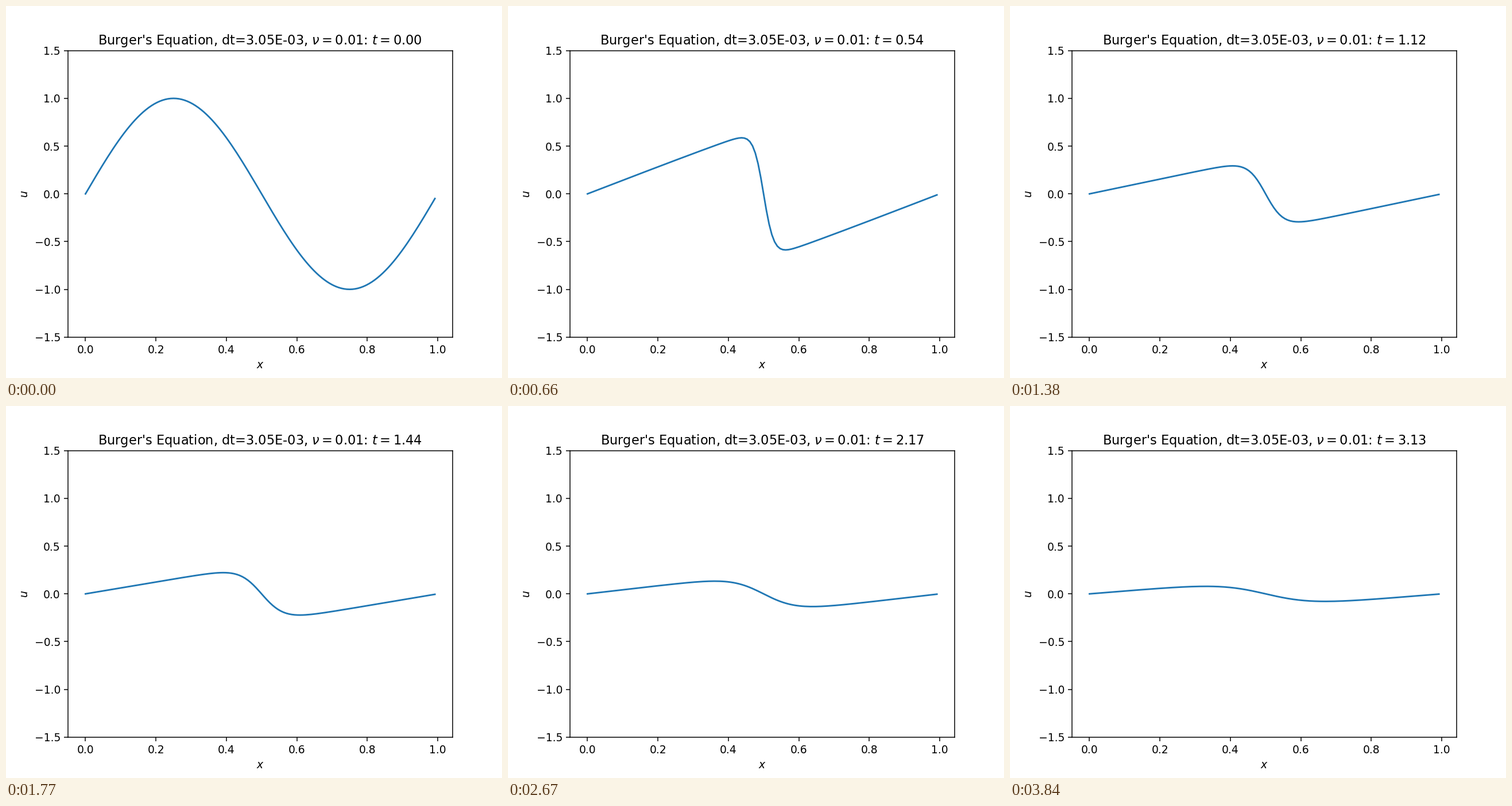
Recreate the animation shown at these times as a matplotlib script. Size 864 by 648 pixels, loop 3.87 s.

```python
import numpy as np
import matplotlib.pyplot as plt
from matplotlib.animation import FuncAnimation

N = 128                    # grid points on the periodic unit interval
NU = 0.01                  # viscosity
DT = 0.5 / N**2 / NU       # diffusive step limit
STEPS = 8                  # time steps per frame
FRAMES = 129
INTERVAL = 30

x = np.arange(N) / N
k = 2 * np.pi * np.fft.rfftfreq(N, 1 / N)

# Cole-Hopf: u = -2 nu phi_x / phi, where phi obeys the heat equation
phi0_hat = np.fft.rfft(np.exp((np.cos(2 * np.pi * x) - 1) / (4 * np.pi * NU)))


def solve(t):
    if t == 0:
        return np.sin(2 * np.pi * x)
    phi_hat = phi0_hat * np.exp(-NU * k**2 * t)
    phi = np.fft.irfft(phi_hat, N)
    phi_x = np.fft.irfft(1j * k * phi_hat, N)
    return -2 * NU * phi_x / phi


def title_text(t):
    # the small offset rounds exact halves up
    return rf"Burger's Equation, dt={DT:.2E}, $\nu={NU}$: $t={t + 1e-9:.2f}$"


plt.rcParams["font.family"] = "DejaVu Sans"
fig, ax = plt.subplots(figsize=(6.4, 4.8), dpi=135)
line, = ax.plot(x, solve(0), color="#1f77b4", lw=1.5)
ax.set_xlim(-0.05 * x[-1], 1.05 * x[-1])
ax.set_ylim(-1.5, 1.5)
ax.set_xlabel("$x$")
ax.set_ylabel("$u$")
title = ax.set_title(title_text(0))


def update(i):
    t = i * STEPS * DT
    line.set_ydata(solve(t))
    title.set_text(title_text(t))
    return line, title


anim = FuncAnimation(fig, update, frames=FRAMES, interval=INTERVAL,
                     init_func=lambda: update(0), repeat=True, repeat_delay=0)
plt.show()
```
